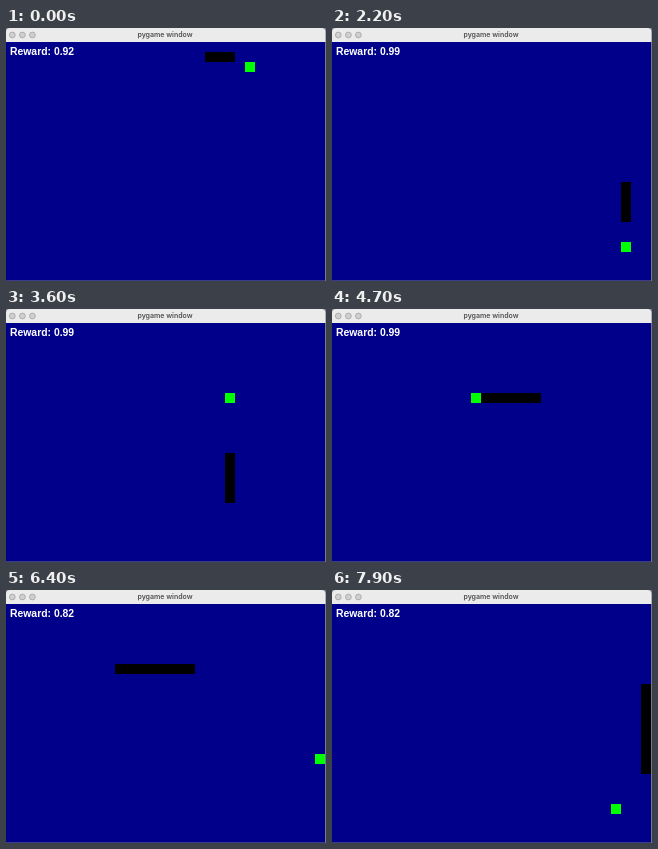
These frames come from a looping animation (320 by 253 pixels, 8 s). An HTML page with a canvas:

```html
<!DOCTYPE html>
<html lang="en">
<head>
<meta charset="utf-8">
<title>pygame window</title>
<style>
  html, body { margin: 0; width: 100%; height: 100%; overflow: hidden; background: #77778c; }
  canvas { display: block; }
</style>
</head>
<body>
<canvas id="stage" width="320" height="253"></canvas>
<script>
const ctx = document.getElementById('stage').getContext('2d');
const LOOP = 8000, FRAME = 100, CELL = 10;

// Food cells in the order they are eaten; the snake closes the x gap first
// unless the third value asks for y first.
const foods = [[24, 2], [29, 20], [22, 7], [14, 7], [5, 6], [31, 15], [28, 20, true]];

// The game speeds up by one tick per second with each food eaten.
const tickLength = eaten => Math.floor(1000 / (10 + eaten)) + 2;

function simulate() {
  const trail = [[20, 1], [21, 1], [22, 1]];
  const states = [];
  let [x, y] = trail[2], time = -24, eaten = 0;
  while (time < LOOP && eaten < foods.length) {
    states.push({ time, eaten, body: trail.slice(-3 - eaten) });
    time += tickLength(eaten);
    const [fx, fy, yFirst] = foods[eaten];
    const dx = Math.sign(fx - x), dy = Math.sign(fy - y);
    if (dx && !(yFirst && dy)) x += dx;
    else y += dy;
    trail.push([x, y]);
    if (x === fx && y === fy) eaten++;
  }
  return states;
}

const states = simulate();

function rect(color, x, y, w, h) {
  ctx.fillStyle = color;
  ctx.fillRect(x, y, w, h);
}

function cell(color, [x, y]) {
  rect(color, x * CELL - 1, y * CELL + 14, CELL, CELL);
}

function text(str, x, y, font, color, align) {
  ctx.font = font;
  ctx.fillStyle = color;
  ctx.textAlign = align;
  ctx.fillText(str, x, y);
}

function drawWindow() {
  rect('#77778c', 0, 0, 320, 253);
  ctx.fillStyle = '#ebebeb';
  ctx.beginPath();
  ctx.roundRect(0, 0, 319.5, 14, [4, 4, 0, 0]);
  ctx.fill();
  rect('#00008b', 0, 14, 319, 238.5);
  ctx.lineWidth = 0.7;
  for (const x of [6.3, 16.4, 26.4]) {
    ctx.beginPath();
    ctx.arc(x, 7, 2.9, 0, 2 * Math.PI);
    ctx.fillStyle = '#cfcfcf';
    ctx.strokeStyle = '#9c9c9c';
    ctx.fill();
    ctx.stroke();
  }
  text('pygame window', 159, 9.4, '600 7px Inter, sans-serif', '#505050', 'center');
}

function draw(t) {
  const { eaten, body } = states.findLast(s => s.time <= t);
  const reward = eaten < 1 ? '0.92' : eaten < 5 ? '0.99' : '0.82';
  drawWindow();
  body.forEach(c => cell('#000', c));
  cell('#0f0', foods[eaten]);
  text('Reward: ' + reward, 4, 27, 'bold 10.4px "Liberation Sans", Arial, sans-serif', '#fff', 'left');
}

const start = performance.now();
function loop() {
  const t = (performance.now() - start) % LOOP;
  draw(Math.floor(t / FRAME) * FRAME);
  requestAnimationFrame(loop);
}
loop();
</script>
</body>
</html>
```
